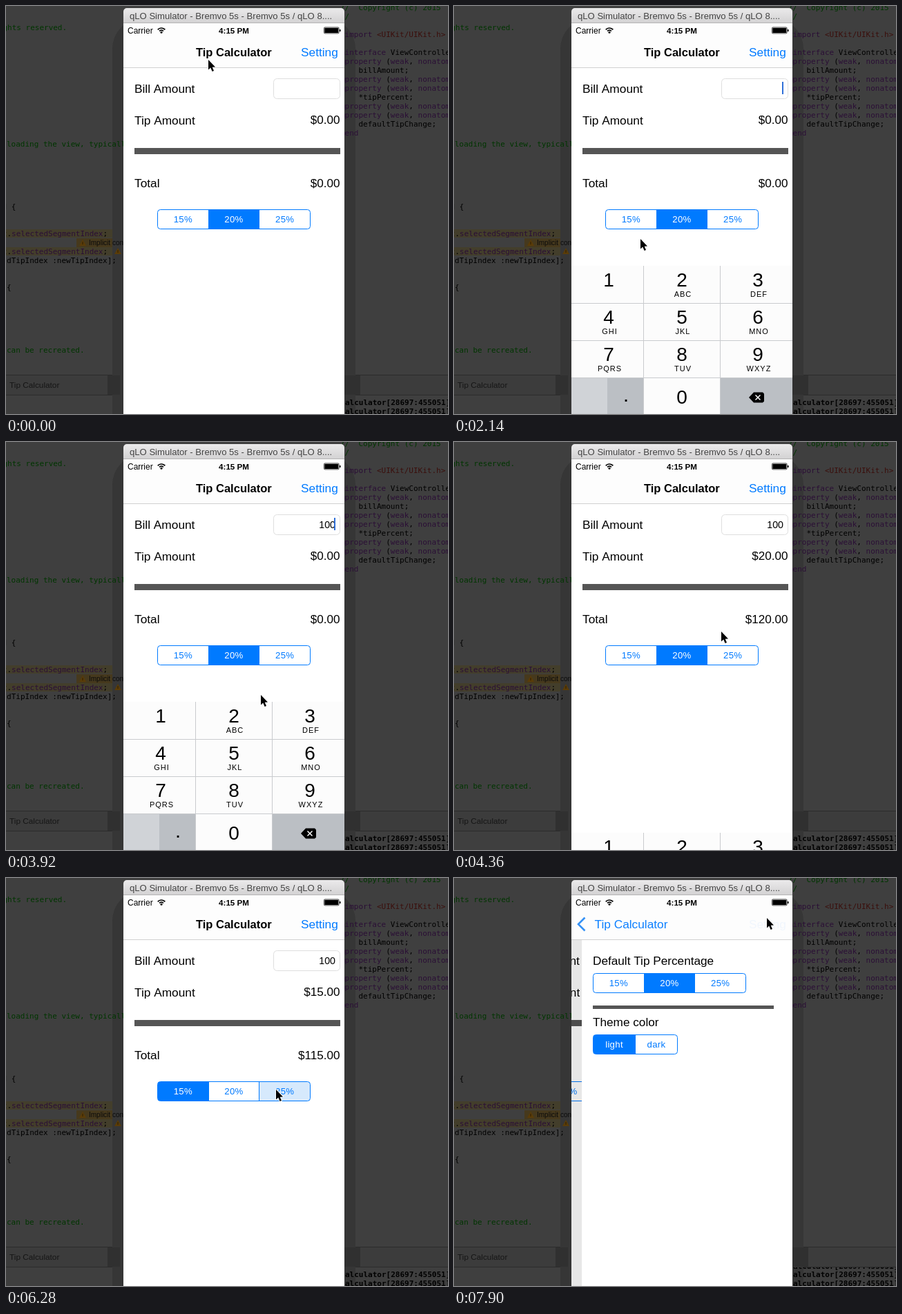
Write an HTML page with a canvas that moves like this. It is 640 by 592 pixels and loops after 8000 ms.

```html
<!DOCTYPE html>
<html lang="en">
<head>
<meta charset="utf-8">
<title>Tip Calculator</title>
<style>
html, body { margin: 0; width: 100%; height: 100%; overflow: hidden; background: #3f3f3f; }
canvas { display: block; }
</style>
</head>
<body>
<canvas id="stage" width="640" height="592"></canvas>
<script>
const g = document.getElementById('stage').getContext('2d');
const SANS = '"Liberation Sans", Arial, sans-serif';
const MONO = '11px "DejaVu Sans Mono", monospace';
const BLUE = '#007aff', GREEN = '#003600', PURPLE = '#2b0f36', RED = '#3b0f0c';
const LOOP = 8000, START = 510, TICK = 147.75;

function text(s, x, y, size, color = '#000', align = 'left', spacing = 0) {
  g.font = typeof size === 'number' ? `${size}px ${SANS}` : size;
  g.fillStyle = color;
  g.textAlign = align;
  g.letterSpacing = spacing + 'px';
  g.fillText(s, x, y);
}
function rect(x, y, w, h, color) {
  g.fillStyle = color;
  g.fillRect(x, y, w, h);
}
function round(x, y, w, h, r) {
  g.beginPath();
  g.roundRect(x, y, w, h, r);
}
function poly(points, close = true) {
  g.beginPath();
  points.forEach(([x, y]) => g.lineTo(x, y));
  if (close) g.closePath();
}
function clipped(x, y, w, h, draw) {
  g.save();
  g.beginPath();
  g.rect(x, y, w, h);
  g.clip();
  draw();
  g.restore();
}
function faded(alpha, draw) {
  g.save();
  g.globalAlpha = alpha;
  draw();
  g.restore();
}
// Monospaced line built from [string, color] pieces
function code(x, y, ...pieces) {
  for (const [s, color] of pieces) {
    text(s, x, y, MONO, color);
    x += s.length * 6.623;
  }
}
function warning(x, y) {
  poly([[x + 5, y], [x + 10, y + 9], [x, y + 9]]);
  g.fillStyle = '#5a3c08';
  g.fill();
  rect(x + 4.5, y + 3, 1, 4, '#2a1c04');
}

function editor(tick) {
  rect(0, 0, 640, 592, '#3f3f3f');
  rect(0, 324, 170, 12, '#433e2b');
  rect(0, 350, 170, 12, '#433e2b');
  rect(102, 337, 68, 13, '#46391d');
  rect(155, 350, 15, 12, '#46391d');
  rect(0, 535, 640, 29, '#3c3c3c');
  rect(0, 535, 640, 1, '#2c2c2c');
  rect(0, 564, 640, 1, '#2c2c2c');
  g.fillStyle = '#363636';
  round(154, 18, 352, 620, 44);
  g.fill();
  rect(147, 536, 18, 28, '#303030');
  rect(490, 536, 23, 28, '#303030');

  code(-4.6, 35, ['ghts reserved.', GREEN]);
  code(1, 204, ['loading the view, typically from', GREEN]);
  code(-5.6, 295, ['d {', '#000']);
  for (const y of [334, 360]) code(-5.2, y, ['t.', '#000'], ['selectedSegmentIndex', PURPLE], [';', '#000']);
  code(-5.6, 373, ['ldTipIndex :newTipIndex];', '#000']);
  code(1, 412, ['{', '#000']);
  code(1, 503, ['can be recreated.', GREEN]);
  warning(106, 339);
  text('Implicit con', 120, 347, 10, '#0c0c0c');
  warning(157, 351);
  text('Tip Calculator', 5, 554, 11.8, '#161616');

  code(484, 6, ['//  Copyright (c) 2015 ', GREEN]);
  code(484, 19, ['//', GREEN]);
  code(484, 45, ['#import ', PURPLE], ['<UIKit/UIKit.h>', RED]);
  code(484, 71, ['@interface', PURPLE], [' ViewController', '#000']);
  for (const y of [84, 110, 123, 149, 162])
    code(484, y, ['@property', PURPLE], [' (', '#000'], ['weak', PURPLE], [', ', '#000'], ['nonatomic', PURPLE]);
  code(510.5, 97, ['billAmount;', '#000']);
  code(510.5, 136, ['*tipPercent;', '#000']);
  code(510.5, 175, ['defaultTipChange;', '#000']);
  code(484, 188, ['@end', PURPLE]);
  clipped(490, 565, 150, 27, () => {
    for (const y of tick >= 50 ? [567, 579, 592] : [579, 592])
      text('alculator[28697:455051]', 491, y, 'bold ' + MONO);
  });
}

function segments(x, y, w, labels, selected, pressed = -1) {
  const cell = w / labels.length;
  g.save();
  round(x, y, w, 28, 4);
  g.fillStyle = '#fff';
  g.fill();
  g.save();
  g.clip();
  if (pressed >= 0) rect(x + pressed * cell, y, cell, 28, '#d6e9fc');
  rect(x + selected * cell, y, cell, 28, BLUE);
  for (let i = 1; i < labels.length; i++) rect(Math.round(x + i * cell - 0.5), y, 1, 28, BLUE);
  g.restore();
  g.strokeStyle = BLUE;
  g.lineWidth = 1;
  g.stroke();
  labels.forEach((s, i) =>
    text(s, x + (i + 0.5) * cell, y + 18.5, 13.2, i === selected ? '#fff' : BLUE, 'center', 0.3));
  g.restore();
}
const RATES = ['15%', '20%', '25%'];

function calculator(s) {
  rect(170, 90, 320, 502, '#fff');
  text('Bill Amount', 186, 125.5, 17.3);
  text('Tip Amount', 186, 171.5, 17.3);
  text('Total', 186, 262.5, 17.3);
  g.strokeStyle = '#dedede';
  g.lineWidth = 1;
  round(387.5, 105.5, 96, 29, 5);
  g.stroke();
  text(s.bill, 477, 125, 14.2, '#000', 'right');
  if (s.caret) rect(475, 110, 2, 18, '#2f6fd8');
  text(s.tip, 483.5, 170.5, 17.1, '#000', 'right');
  text(s.total, 483.5, 262.5, 17.1, '#000', 'right');
  rect(186, 206, 298, 9, '#555');
  segments(219.5, 295.5, 221, RATES, s.rate, s.pressedRate);
}

function settings(x) {
  rect(x, 90, 320, 502, '#fff');
  text('Default Tip Percentage', x + 16, 125.5, 17.2);
  segments(x + 16.5, 138.5, 221, RATES, 1);
  rect(x + 16, 185, 262, 5, '#555');
  text('Theme color', x + 16, 214.5, 17.2);
  segments(x + 16.5, 227.5, 122, ['light', 'dark'], 0);
}

const KEYS = ['', 'ABC', 'DEF', 'GHI', 'JKL', 'MNO', 'PQRS', 'TUV', 'WXYZ'];
const COLUMNS = [224, 330, 440];
function keyboard(drop, key) {
  const top = 377 + drop, DARK = '#bbbfc4';
  rect(170, top, 320, 216, '#fcfcfc');
  rect(170, top + 163, 52, 54, '#d0d3d7');
  rect(222, top + 163, 53, 54, DARK);
  rect(386, top + 163, 104, 54, DARK);
  if (key === '1') rect(170, top, 104, 54, DARK);
  if (key === '0') rect(275, top + 163, 111, 54, DARK);
  for (const y of [54, 108, 162]) rect(170, top + y, 320, 1, '#c9cbce');
  for (const x of [274, 385]) rect(x, top, 1, 216, '#c9cbce');
  KEYS.forEach((letters, i) => {
    const x = COLUMNS[i % 3], y = top + Math.floor(i / 3) * 54;
    text(i + 1, x, y + 30, 28, '#000', 'center');
    text(letters, x + 1.5, y + 45, 11, '#000', 'center', 1);
  });
  text('0', 330, top + 200, 28, '#000', 'center');
  text('.', 249, top + 197, 'bold 20px ' + SANS, '#000', 'center');
  const y = top + 191;
  poly([[427, y], [434, y - 7.5], [447, y - 7.5], [449, y - 5.5], [449, y + 5.5], [447, y + 7.5], [434, y + 7.5]]);
  g.fillStyle = '#000';
  g.fill();
  g.strokeStyle = '#fff';
  g.lineWidth = 1.5;
  for (const d of [-3.5, 3.5]) {
    poly([[440 - d, y - 3.5], [440 + d, y + 3.5]], false);
    g.stroke();
  }
}

function bars(push, pressed) {
  rect(170, 25, 320, 64, '#fdfdfd');
  rect(170, 89, 320, 1, '#d0d0d0');
  text('Carrier', 176, 39.5, 12);
  g.strokeStyle = '#000';
  g.lineWidth = 1.7;
  for (const r of [3.9, 7]) {
    g.beginPath();
    g.arc(225, 39, r, -Math.PI * 0.77, -Math.PI * 0.23);
    g.stroke();
  }
  g.beginPath();
  g.arc(225, 38.3, 1.5, 0, 7);
  g.fillStyle = '#000';
  g.fill();
  text('4:15 PM', 330, 39.5, 'bold 11.6px ' + SANS, '#000', 'center');
  g.strokeStyle = '#000';
  g.lineWidth = 0.7;
  round(460.4, 30.9, 21.8, 9, 1.5);
  g.stroke();
  rect(461.3, 31.8, 20, 7.2, '#000');
  rect(483, 34, 1.5, 3, '#000');

  const x = 275 - 75 * push;
  faded(Math.max(0, 1 - push * 1.2), () => text('Tip Calculator', x, 73, `bold 16.5px ${SANS}`));
  if (push) faded(push, () => {
    text('Tip Calculator', x, 73, 17.3, BLUE);
    g.strokeStyle = '#2b8cf5';
    g.lineWidth = 2.6;
    poly([[189.5, 57.5], [180, 67], [189.5, 76.5]], false);
    g.stroke();
  });
  faded(push ? 0.2 * (1 - push) + 0.04 : pressed ? 0.22 : 1, () => text('Setting', 427, 73, 17.3, BLUE));
}

function titleBar() {
  const shade = g.createLinearGradient(0, 3, 0, 25);
  shade.addColorStop(0, '#ebeaeb');
  shade.addColorStop(1, '#d2d1d2');
  g.fillStyle = shade;
  round(170, 3, 320, 22, [5, 5, 0, 0]);
  g.fill();
  rect(170, 24, 320, 1, '#b4b3b4');
  text('qLO Simulator - Bremvo 5s - Bremvo 5s / qLO 8....', 179, 19, 13.1, '#444');
}

// Pointer stops: [tick, x, y]
const PATH = [
  [-1, 293, 78], [0, 318, 86], [1, 382, 107], [2, 416, 118], [8, 416, 118], [10, 310, 280],
  [12, 230, 396], [14, 230, 396], [16, 318, 530], [17, 333, 551], [21, 333, 551], [24, 387, 275],
  [27, 387, 275], [31, 258, 305], [34, 258, 305], [38, 391, 307], [42, 391, 307], [47, 453, 58], [51, 453, 58]
];
function pointer(tick) {
  const i = Math.max(1, PATH.findIndex(p => p[0] >= tick));
  const [t0, x0, y0] = PATH[i - 1], [t1, x1, y1] = PATH[i];
  const k = (tick - t0) / (t1 - t0);
  g.save();
  g.translate(x0 + (x1 - x0) * k, y0 + (y1 - y0) * k);
  poly([[0, 0], [0, 14.5], [3.2, 11.6], [5.6, 17], [8, 16], [5.7, 10.7], [10, 10.4]]);
  g.lineJoin = 'round';
  g.strokeStyle = '#fff';
  g.lineWidth = 1.8;
  g.stroke();
  g.fillStyle = '#000';
  g.fill();
  g.restore();
}

function keyboardDrop(tick) {
  if (tick < 5 || tick > 26) return 216;
  return { 5: 84, 6: 6, 25: 92, 26: 190 }[tick] || 0;
}

function draw(tick) {
  const rate = tick >= 40 ? 2 : tick >= 33 ? 0 : 1;
  const tip = tick >= 25 ? 15 + rate * 5 : 0;
  const push = tick >= 50 ? 305 / 320 : tick === 49 ? 0.58 : 0;
  const state = {
    bill: '100'.slice(0, tick >= 20 ? 3 : tick >= 17 ? 2 : tick >= 13 ? 1 : 0),
    caret: tick >= 5 && tick < 25,
    tip: `$${tip.toFixed(2)}`,
    total: `$${(tip ? 100 + tip : 0).toFixed(2)}`,
    rate,
    pressedRate: tick === 32 ? 0 : tick === 39 ? 2 : -1
  };
  const key = tick === 13 ? '1' : [17, 18, 20].includes(tick) ? '0' : '';

  editor(tick);
  titleBar();
  clipped(170, 25, 320, 567, () => {
    g.save();
    g.translate(-96 * push, 0);
    calculator(state);
    g.restore();
    if (push) {
      rect(170, 90, 320, 502, `rgba(0,0,0,${0.1 * push})`);
      settings(170 + Math.round(320 * (1 - push)));
    }
    bars(push, tick >= 48);
    const drop = keyboardDrop(tick);
    if (drop < 216) keyboard(drop, key);
  });
  pointer(tick);
}

function frame() {
  const t = performance.now() % LOOP;
  draw(Math.max(-1, Math.floor((t - START) / TICK)));
  requestAnimationFrame(frame);
}
frame();
</script>
</body>
</html>
```
